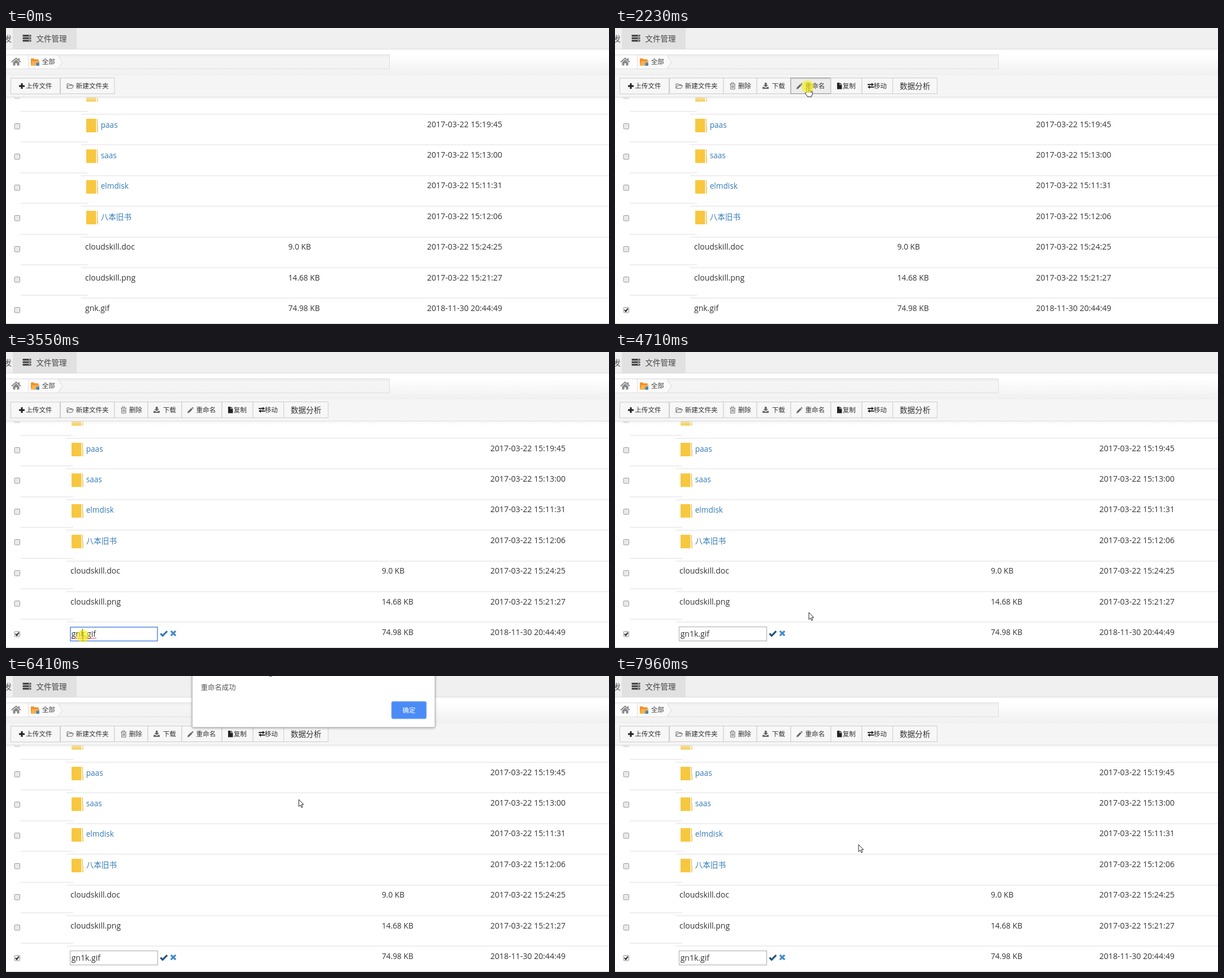
Animation, 1067 px wide and 525 px high, one loop 8000 ms. Source, as an HTML page:

```html
<!DOCTYPE html>
<html lang="zh-CN">
<head>
<meta charset="utf-8">
<style>
html, body { margin: 0; width: 100%; height: 100%; overflow: hidden; background: #fff; }
svg { display: block; width: 1067px; height: 525px; }
text { font-family: "Open Sans", "Noto Sans CJK SC", "Noto Sans CJK", sans-serif; white-space: pre; }
.panel { filter: drop-shadow(0 1px 2px #0005); }
</style>
</head>
<body>
<svg id="stage" viewBox="0 0 1067 525">
  <defs>
    <linearGradient id="head" x2="0" y2="1"><stop offset=".2" stop-color="#fff"/><stop offset="1" stop-color="#f0f0f0"/></linearGradient>
    <linearGradient id="crumb" x2="0" y2="1"><stop stop-color="#ededed"/><stop offset=".25" stop-color="#f5f5f5"/><stop offset="1" stop-color="#f3f3f3"/></linearGradient>
    <linearGradient id="shade" x2="0" y2="1"><stop stop-color="#eee" stop-opacity=".6"/><stop offset="1" stop-color="#fff" stop-opacity="0"/></linearGradient>
  </defs>
  <g id="scene"></g>
</svg>
<script>
const LOOP = 8000, TICK = 77.35, PITCH = 54.4;
const CHECK = 16, TOOLS = 17, RENAME = 28, EDIT = 31, FOCUS = 45, TYPE = 53, SAVE = 57, OPEN = 74.4, OK = 97, CLOSE = 99;
const CLICKS = [CHECK, RENAME, FOCUS, SAVE, OK];
// Pointer path: tick, x, y
const PATH = [
  [0, 513, 457], [9, 66, 506], [11, 66, 506], [15, 20, 499], [18, 20, 499], [21, 53, 494],
  [26, 341, 104], [31, 341, 104], [39, 136, 504], [46, 136, 504], [50, 150, 512], [52, 150, 512],
  [56, 279, 499], [58, 279, 499], [62, 407, 424], [66, 523, 183], [69, 523, 183], [74, 471, 258],
  [80, 471, 258], [87, 706, 61], [98, 706, 61], [102, 431, 299]
];
const ROWS = [
  ['', '', ''], ['paas', '', '2017-03-22 15:19:45'], ['saas', '', '2017-03-22 15:13:00'],
  ['elmdisk', '', '2017-03-22 15:11:31'], ['八本旧书', '', '2017-03-22 15:12:06'],
  ['cloudskill.doc', '9.0 KB', '2017-03-22 15:24:25'],
  ['cloudskill.png', '14.68 KB', '2017-03-22 15:21:27'],
  ['gnk.gif', '74.98 KB', '2018-11-30 20:44:49']
];
const BUTTONS = [
  [8.5, 87, '上传文件', 35.2], [96.5, 95.5, '新建文件夹', 123.7], [192, 59, '删除', 217.7], [251, 60, '下载', 277.7],
  [311, 71, '重命名', 336.5], [382, 55, '复制', 402.7], [437, 54.5, '移动', 457.7], [491.5, 78.5, '数据分析', 503.7]
];
const ICONS = [
  ['M28 98v10M23 103h10', 'none', '#222', 3],
  ['M108 107v-8h4l1 1.500h4v2M108 107l2.500-5h9l-2.500 5z', 'none', '#666', 1],
  ['M203 99.500h10M206 99v-2h4v2M204.500 100v8.500h7.500v-8.500M206.700 101.500v5M208.300 101.500v5M210 101.500v5', 'none', '#777', 1],
  ['M265 97h3.500v4h2.500l-4.200 4-4.300-4h2.500zM261 104.500h3l2.700 2 2.800-2h2.500v3.500h-11z', '#666'],
  ['M321 108.500l.8-3 6-6 2.200 2.200-6 6zM328.500 98.800l1.300-1.300 2.200 2.200-1.300 1.300z', '#666'],
  ['M393 97h4.500v4h4v7.500h-8.500zM398.300 97l3.200 3.200h-3.200z', '#222'],
  ['M447 99.300h7v-2l4 3-4 3v-2h-7zM458 103.700h-7v-2l-4 3 4 3v-2h7z', '#222']
];

const rect = (x, y, w, h, fill, more = '') => `<rect x="${x}" y="${y}" width="${w}" height="${h}" fill="${fill}" ${more}/>`;
const path = (d, fill, stroke = 'none', width = 1) => `<path d="${d}" fill="${fill}" stroke="${stroke}" stroke-width="${width}"/>`;
const text = (x, y, s, size = 14, fill = '#333') => `<text x="${x}" y="${y}" font-size="${size}" fill="${fill}">${s}</text>`;
const clamp = v => Math.max(0, Math.min(1, v));
const inside = ([x, y], l, t, r, b) => x >= l && x <= r && y >= t && y <= b;

function pointerAt(k) {
  const i = PATH.findIndex(p => p[0] > k);
  if (i < 0) return PATH[PATH.length - 1].slice(1);
  const [a, b] = [PATH[i - 1], PATH[i]], p = (k - a[0]) / (b[0] - a[0]), e = p * p * (3 - 2 * p);
  return [1, 2].map(n => Math.round(a[n] + (b[n] - a[n]) * e));
}

function editor(k) {
  const focus = k >= FOCUS && k < SAVE, typed = k >= TYPE;
  let out = focus ? rect(114, 488, 154, 24.5, '#fff', 'stroke="#5c92e6" stroke-width="1.600"')
    : rect(113.5, 487.5, 155, 25, '#fff', 'stroke="#a9a9a9"');
  out += text(115.7, 505, typed ? 'gn1k.gif' : 'gnk.gif');
  if (focus) {
    out += path('M116 508.500' + 'l2 -1.500l2 1.500'.repeat(typed ? 13 : 11), 'none', '#e33')
      + rect(typed ? 140.5 : 135, 491, 1, 17, '#333');
  }
  return out + path('M273.500 499.500l3.700 3.700 8-8', 'none', k < SAVE ? '#337ab7' : '#23527c', 3.2)
    + path('M291.800 494.800l8.400 8.400m0-8.400l-8.400 8.400', 'none', '#428bca', 3.2);
}

function folder(x, y) {
  return rect(x, y, 17.5, 24, '#f7c73f') + rect(x + 19, y, 1, 24, '#d9b458') + rect(x + 19, y + 12, 2, 12, '#f3cf74');
}

function row([name, size, date], i, k) {
  const top = 153 + PITCH * (i - 1), editing = k >= EDIT, x = editing ? 114 : 140, last = i === 7;
  const line = (x1, x2, y) => rect(x1, Math.round(y) - .5, x2 - x1, 1, '#ddd');
  const cy = Math.round(top + 21);
  let out = line(26, x + 5, top - 5) + line(x - 7, 1067, top)
    + rect(15, cy - 4.5, 9.5, 9.5, '#eaeaea', 'rx="1.500" stroke="#999"');
  if (last && k >= CHECK) out += path(`M17 ${cy}l2 2.500 3.800-5`, 'none', '#222', 2);
  if (i < 5) out += folder(x + 2, top + 8) + text(x + 27.7, top + 23.5, name, 13.6, '#337ab7');
  else out += last && editing ? editor(k) : text(x, top + 22.5, name);
  return out + text(editing ? 665 : 499.5, top + 22.5, size, 13.7) + text(editing ? 857 : 745, top + 22.5, date, 14.1);
}

function header() {
  let bars = '';
  for (let i = 0; i < 3; i++) bars += rect(29.5, 12 + i * 4.5, 15, 3.3, '#444', 'rx=".8"') + rect(40, 13.1 + i * 4.5, 3, 1, '#ddd');
  return rect(0, 0, 1067, 37, '#f0f0f0') + rect(12, 0, 113, 37, '#e1e1e1') + rect(0, 37, 1067, 1, '#dcdcdc')
    + text(-3.5, 23.5, '发', 13.6, '#555') + bars + text(53.5, 23.5, '文件管理', 13.5, '#444')
    + rect(0, 38, 1067, 46, 'url(#head)')
    + rect(-.5, 47.5, 679, 25, 'url(#crumb)', 'stroke="#ddd"')
    + path('M0 48.500h92l8 12-8 11.500h-92z', '#fafafa') + path('M92 48.500l8 12-8 11.500', 'none', '#d5d5d5')
    + rect(0, 48.5, 39, 23.5, '#fdfdfd') + rect(39, 48, 1, 24, '#ddd')
    + path('M10 60.500l8-7 8 7', 'none', '#888', 2) + path('M12.500 61l5.500-5 5.500 5v5.500h-4v-4h-3v4h-4zM22 53.500h2v4h-2z', '#888')
    + path('M44 54h5l1.500 1.500h7v3h1.500l-2 8h-13z', '#f0922b') + path('M46.500 59h13l-2.500 7.500h-13z', '#f9b04d')
    + rect(53.5, 61.5, 5.5, 5.5, '#3f88c5', 'rx="1"') + text(63.7, 64, '全部', 11.6, '#444');
}

function toolbar(k, over) {
  let out = rect(0, 84, 1067, 38, '#f5f5f5') + rect(0, 122, 1067, 1, '#dedede') + rect(0, 123, 1067, 9, 'url(#shade)');
  BUTTONS.slice(0, k < TOOLS ? 2 : 8).forEach(([x, w, label, tx], i) => {
    const active = i === 4 && (over || k >= RENAME && k < FOCUS);
    out += rect(x, i ? 88.5 : 89, w, 28, active ? '#ececec' : '#f7f7f7', `stroke="${active ? '#8c8c8c' : '#ccc'}"`);
    if (active) out += rect(x + .5, 89, w - 1, 2, '#ddd');
    if (ICONS[i]) out += path(...ICONS[i]);
    out += text(tx, i < 7 ? 107 : 108, label, i < 7 ? 11.6 : 13.6);
  });
  return out;
}

function dialog(k) {
  const p = k < CLOSE ? clamp((k - OPEN) / 2.6) : 0;
  if (!p) return '';
  // Fades in while sliding down and settling to its size
  return `<g opacity="${p}" transform="translate(544 ${-16 * (1 - p)}) scale(${1 + .01 * (1 - p)}) translate(-544 0)">`
    + rect(329.5, -30, 429.5, 121, '#fff', 'class="panel" rx="2" stroke="#aaa" stroke-width=".8"')
    + path('M466 0q2 1 5 0', 'none', '#333') + text(344.7, 24.5, '重命名成功', 12.4, '#555')
    + rect(682, 45, 62, 31, '#4a8bf5', 'rx="3" stroke="#9fc2fb"') + text(701.5, 65, '确定', 11.6, '#fff') + '</g>';
}

function pointer(k, pos, over) {
  const editing = k >= EDIT;
  let shape = path('M0 0v12.500l2.900-2.700 2 4.600 2-.9-2-4.500h3.800z', '#fff', '#222');
  if (editing && inside(pos, 114, 487, 268, 513)) shape = path('M-2.500-6.500h2l.5.5.5-.5h2M0-6v13M-2.500 7.500h2l.5-.5.5.5h2', 'none', '#333');
  else if (over || editing && inside(pos, 272, 492, 302, 507))
    shape = path('M-1.500 10v-8.500q1.500-2 3 0v5q1.500-1 2.500.5 1.500-.7 2.300.7 2-.2 2 1.800v4l-1.800 4.500h-6.500l-4.500-6q0-2 1.500-1.500zM1.500 6.500v4M4 7v3.500M6.300 8v3', '#fff', '#222');
  const click = CLICKS.some(c => k === c || k === c + 1);
  return `<g transform="translate(${pos})">${shape}${click ? '<circle r="11" fill="#f7ee10" opacity=".65"/>' : ''}</g>`;
}

function scene(k) {
  const pos = k < 0 ? [-50, -50] : pointerAt(k), over = k >= TOOLS && inside(pos, 311, 88, 382, 117);
  return rect(0, 0, 1067, 525, '#fff') + ROWS.map((r, i) => row(r, i, k)).join('') + rect(0, 524, 1067, 1, '#ccc')
    + header() + toolbar(k, over) + dialog(k) + pointer(k, pos, over);
}

const layer = document.getElementById('scene');
let shown;
function draw() {
  const k = Math.floor(performance.now() % LOOP / TICK - .65);
  if (k !== shown) layer.innerHTML = scene(shown = k);
  requestAnimationFrame(draw);
}
draw();
</script>
</body>
</html>
```
